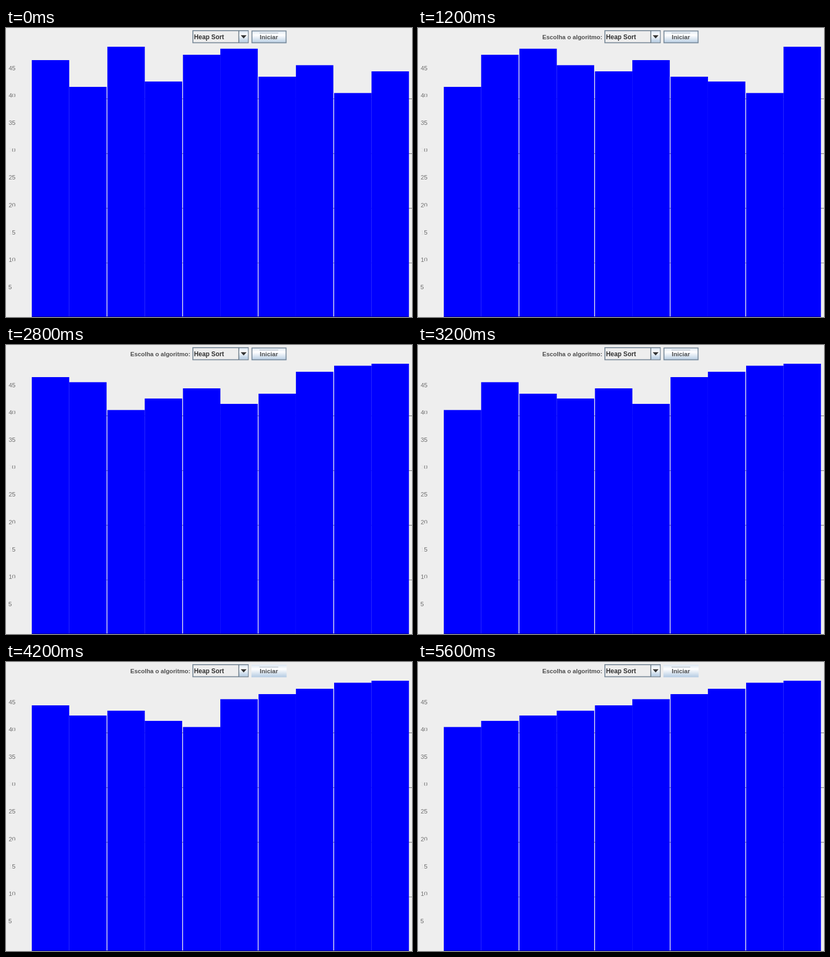
An HTML page for the animation above (5.8 s loop, 756 by 540 pixels).

```html
<!DOCTYPE html>
<html lang="pt">
<head>
<meta charset="utf-8">
<title>Heap Sort</title>
<style>
  html, body { margin: 0; width: 100%; height: 100%; overflow: hidden; background: #eee; }
  svg { display: block; width: 756px; height: 540px; }
  text { font-family: "Liberation Sans", Arial, sans-serif; font-weight: bold; fill: #333; }
  .tick { font-weight: normal; font-size: 11.5px; fill: #666; }
</style>
</head>
<body>
<svg id="stage" viewBox="0 0 756 540">
  <defs>
    <linearGradient id="metal" x1="0" y1="0" x2="0" y2="1">
      <stop offset="0" stop-color="#dce7f2"/>
      <stop offset=".35" stop-color="#fff"/>
      <stop offset="1" stop-color="#b4cbe2"/>
    </linearGradient>
  </defs>
  <rect width="756" height="540" fill="#eee"/>
  <g id="axis"></g>
  <g id="bars" fill="#00f"></g>
  <path d="M48 539.5H750" stroke="#000090"/>

  <text id="prompt" x="231.5" y="21" font-size="11.3" opacity=".85">Escolha o algoritmo:</text>

  <rect x="348" y="5" width="103" height="22.5" fill="#eee" stroke="#7a8a99" stroke-width="1.8"/>
  <rect x="434" y="6" width="16.5" height="20.5" fill="url(#metal)"/>
  <path d="M433.5 5V27.5" stroke="#62727f" stroke-width="1.5"/>
  <path d="M437 13.5H448L442.5 19.5Z" fill="#333"/>
  <text x="350" y="20.5" font-size="11.85">Heap Sort</text>

  <rect x="457" y="5" width="65.5" height="23.5" fill="url(#metal)"/>
  <rect id="outline" x="458" y="5.5" width="63.5" height="22" fill="none" stroke="#7a8a99" stroke-width="1.7"/>
  <path d="M472 9.5H507" stroke="#a9b4bf"/>
  <text x="472.5" y="21" font-size="11.5" opacity=".85">Iniciar</text>
</svg>
<script>
const STEP = 200, LOOP = 5800;
const NS = "http://www.w3.org/2000/svg";
const byId = id => document.getElementById(id);

function add(parent, tag, attrs, text = "") {
  const node = document.createElementNS(NS, tag);
  for (const key in attrs) node.setAttribute(key, attrs[key]);
  node.textContent = text;
  return parent.appendChild(node);
}

// Snapshot of the list after every swap of a heap sort.
function heapSortStates(start) {
  const list = [...start], states = [start];
  const swap = (i, j) => {
    [list[i], list[j]] = [list[j], list[i]];
    states.push([...list]);
  };
  const sift = (i, size) => {
    let child = 2 * i + 1;
    if (child >= size) return;
    if (child + 1 < size && list[child + 1] > list[child]) child++;
    if (list[child] > list[i]) {
      swap(i, child);
      sift(child, size);
    }
  };
  for (let i = (list.length >> 1) - 1; i >= 0; i--) sift(i, list.length);
  for (let end = list.length - 1; end > 0; end--) {
    swap(0, end);
    sift(0, end);
  }
  return states;
}

// Bar tops in pixels, from the smallest value to the largest.
const tops = [121.5, 110, 100, 91, 81, 69.5, 60, 50, 38.7, 35];
const states = heapSortStates([7, 2, 10, 3, 8, 9, 4, 6, 1, 5]);

const axis = byId("axis");
for (let value = 45, y = 75; value > 0; value -= 5, y += 51.1) {
  const round = value % 10 === 0;
  const faint = value === 30 || value === 15;
  const units = value % 10, tens = Math.floor(value / 10);
  if (tens) add(axis, "text", { class: "tick", x: 5, y: y + 4, opacity: faint ? 0.08 : 0.9 }, tens);
  add(axis, "text", { class: "tick", x: tens ? 11.3 : 4.5, y: y + 4 }, units);
  if (round) {
    add(axis, "rect", { x: 11, y: y - 5.5, width: 8, height: 2.3, fill: "#eee" });
    add(axis, "rect", { x: 11, y: y + 2.8, width: 8, height: 2.3, fill: "#eee" });
    add(axis, "path", { d: `M187 ${y + 5.9 + 0.4}H756`, stroke: "#808080", "stroke-width": 1.2 });
  }
}

const bars = tops.map((_, i) => {
  const x = 48 + 140.75 * (i >> 1) + 69.6 * (i % 2);
  return add(byId("bars"), "rect", { x, width: 69.7 });
});

function render(time) {
  const t = time % LOOP;
  states[Math.floor(t / STEP)].forEach((rank, i) => {
    const y = tops[rank - 1];
    bars[i].setAttribute("y", y);
    bars[i].setAttribute("height", 540 - y);
  });
  byId("prompt").setAttribute("visibility", t < STEP ? "hidden" : "visible");
  byId("outline").setAttribute("visibility", t < 4000 ? "visible" : "hidden");
}

const begin = performance.now();
function tick() {
  render(performance.now() - begin);
  requestAnimationFrame(tick);
}
tick();
</script>
</body>
</html>
```
